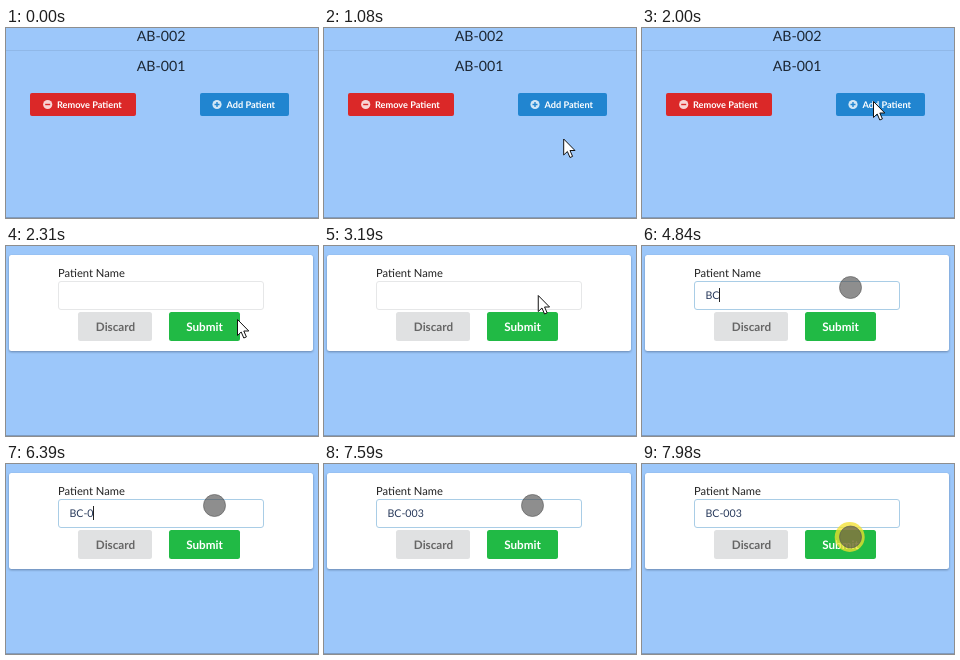
An HTML page that plays this animation: 312x190 px, repeating every 8000 ms.

```html
<!DOCTYPE html>
<html lang="en">
<head>
<meta charset="utf-8">
<title>Add patient</title>
<style>
  html, body { margin: 0; width: 100%; height: 100%; overflow: hidden; background: #9cc7fa; }
  svg { display: block; width: 312px; height: 190px; font-family: Lato, sans-serif; text-rendering: geometricPrecision; }
  .mid { text-anchor: middle; }
  .row { font-size: 14.2px; fill: #1d2733; }
  .small { font-size: 9.2px; font-weight: 700; fill: #fff; }
  .big { font-size: 11.7px; font-weight: 700; }
  #card { filter: drop-shadow(0 1px 1.2px rgba(50, 70, 100, .5)); }
</style>
</head>
<body>
<svg viewBox="0 0 312 190">
  <rect width="312" height="190" fill="#9cc7fa"/>
  <path d="M0 189.5H312" stroke="#7f9cc0"/>

  <g id="list">
    <path d="M0 22.5H312" stroke="#90b8e8"/>
    <text class="row mid" x="155" y="13">AB-002</text>
    <text class="row mid" x="155" y="43">AB-001</text>
    <rect x="24" y="65" width="106" height="23" rx="2" fill="#db2828"/>
    <circle cx="41.7" cy="76.5" r="4.6" fill="#fff" opacity=".8"/>
    <path d="M39.2 76.5h5" stroke="#db2828" stroke-width="1.4"/>
    <text class="small" x="51" y="80">Remove Patient</text>
    <rect x="194" y="65" width="89" height="23" rx="2" fill="#2185d0"/>
    <circle cx="211" cy="76.5" r="4.6" fill="#fff" opacity=".8"/>
    <path d="M208.5 76.5h5M211 74v5" stroke="#2185d0" stroke-width="1.4"/>
    <text class="small" x="220.5" y="80">Add Patient</text>
  </g>

  <g id="form">
    <rect id="card" x="3" y="9" width="304" height="96" rx="2.5" fill="#fff"/>
    <text x="52" y="31" font-size="11.2" fill="#222">Patient Name</text>
    <rect id="field" x="52.5" y="35.5" width="205" height="28" rx="2.5" fill="#fff"/>
    <text id="entry" x="63.5" y="53" font-size="10.6" fill="#26385a"></text>
    <rect id="caret" y="42" width="1" height="14" fill="#222"/>
    <rect x="72" y="66" width="74" height="29" rx="2.5" fill="#e0e1e2"/>
    <text class="big mid" x="109.5" y="85" fill="#666">Discard</text>
    <rect x="163" y="66" width="71" height="29" rx="2.5" fill="#21ba45"/>
    <text class="big mid" x="198.5" y="85" fill="#fff">Submit</text>
  </g>

  <g id="pointer">
    <circle id="glow" cx="-.3" cy=".5" r="15" fill="#f3e02c"/>
    <circle id="dot" cx=".5" cy=".5" fill="#484848" fill-opacity=".62" stroke="#555" stroke-opacity=".6"/>
    <path id="arrow" d="M.5 .5V16.5L4.2 13 6.8 19 9.4 17.9 6.8 12H11.8Z" fill="#fff" stroke="#111"/>
  </g>
</svg>
<script>
const LOOP = 8000;
const $ = id => document.getElementById(id);
const between = (t, ...spans) => spans.some(([a, b]) => t >= a && t < b);
const show = (id, on) => $(id).setAttribute('visibility', on ? 'visible' : 'hidden');

// Pointer waypoints: time, x, y
const path = [
  [700, 254, 184], [860, 244, 138], [1080, 237, 98], [1400, 237, 82],
  [1475, 237, 82], [1700, 231, 73], [2895, 231, 73], [3195, 208, 41],
  [7590, 208, 41], [7750, 208, 72.5]
];
// Screen updates come in bursts: start, interval, steps
const bursts = [[700, 77.8, 10], [1550, 75, 5], [2970, 75, 5], [7590, 80, 3]];
const keys = [4450, 4780, 6000, 6390, 6720, 7050];

function lastUpdate(t) {
  const [start, gap, steps] = bursts.filter(b => b[0] <= t).pop() || [0, 1, 1];
  return start + Math.min(steps - 1, Math.floor((t - start) / gap + .01)) * gap;
}

function pointerAt(t) {
  const i = path.findIndex(p => p[0] > t);
  if (i < 0) return path[path.length - 1].slice(1);
  if (i === 0) return path[0].slice(1);
  const [a, b] = [path[i - 1], path[i]];
  const k = (t - a[0]) / (b[0] - a[0]);
  return [a[1] + (b[1] - a[1]) * k, a[2] + (b[2] - a[2]) * k];
}

function draw(t) {
  const formOpen = t >= 2310;
  show('list', !formOpen);
  show('form', formOpen);

  $('field').setAttribute('stroke', t >= 3410 ? '#a9cde6' : '#e6e7e8');
  $('entry').textContent = 'BC-003'.slice(0, keys.filter(k => k <= t).length);
  $('caret').setAttribute('x', Math.round(63.5 + $('entry').getComputedTextLength() - .5));
  show('caret', between(t, [3500, 3910], [4370, 5230], [5770, 7590]));

  const [x, y] = pointerAt(lastUpdate(t));
  $('pointer').setAttribute('transform', `translate(${x} ${y})`);
  show('arrow', between(t, [700, 4060]));
  show('dot', t >= 4060);
  $('dot').setAttribute('r', t < 4840 ? 10.5 : 11);
  show('glow', between(t, [1775, 2000], [3270, 3410], [7750, LOOP]));
  $('glow').setAttribute('opacity', between(t, [7750, 7980]) ? .6 : .75);
}

function frame() {
  draw(performance.now() % LOOP);
  requestAnimationFrame(frame);
}
frame();
</script>
</body>
</html>
```
